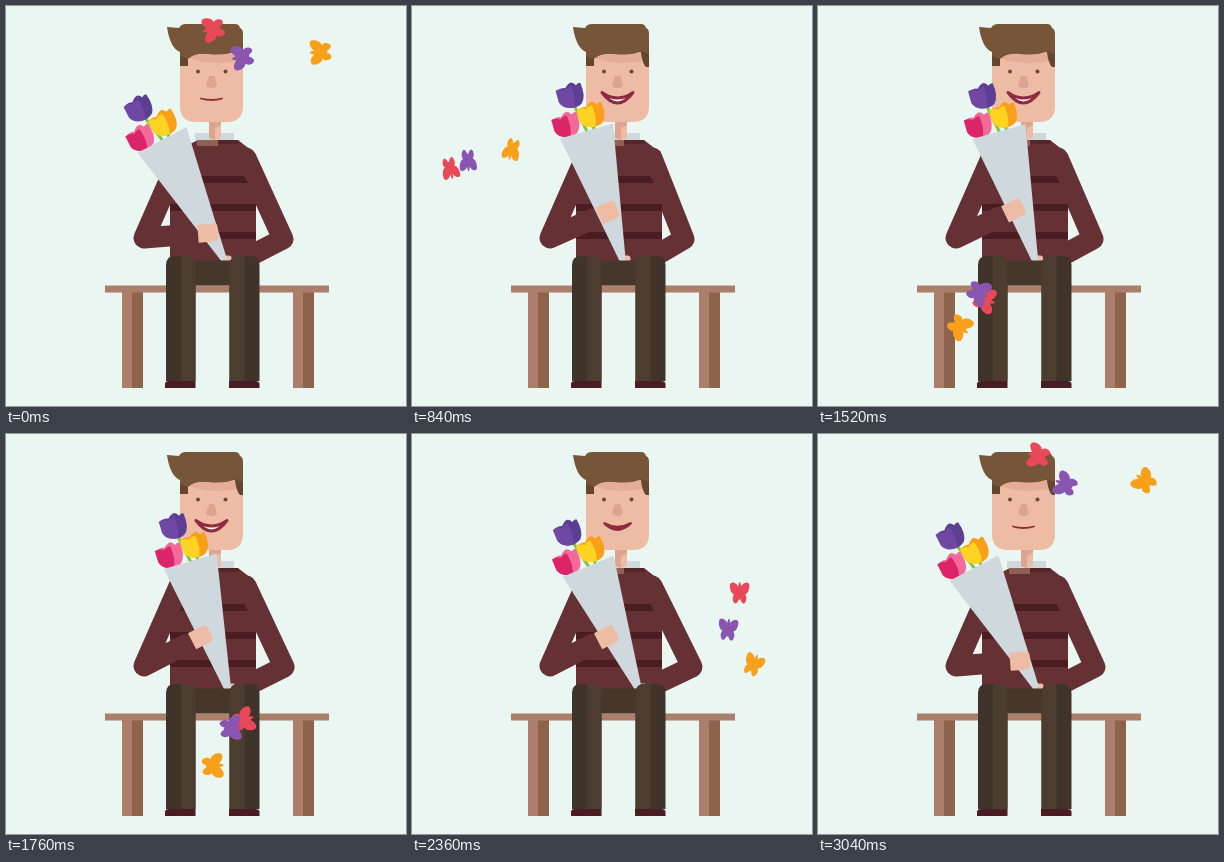
An HTML page for the animation above (3.08 s loop, 400 by 400 pixels).

```html
<!DOCTYPE html>
<html lang="en">
<head>
<meta charset="utf-8">
<title>Bouquet and butterflies</title>
<style>
  html, body { margin: 0; width: 100%; height: 100%; overflow: hidden; background: #e9f6f2; }
  svg { display: block; width: 100vw; height: 100vh; }
  .sleeve { fill: none; stroke: #653134; stroke-width: 21; stroke-linecap: round; stroke-linejoin: round; }
</style>
</head>
<body>
<svg viewBox="0 0 400 400">
  <defs>
    <g id="tulipBack">
      <path d="M-12 -9Q-6 -11 -3 -9Q1 -13 4 -13Q7 -12 8 -9Q11 -11 13 -10Q15 4 9 10Q4 13 -2 12Q-10 10 -12 3Z"/>
    </g>
    <path id="tulipFront" d="M-13 -9Q-7 -10 -4 -7Q0 -10 3 -9Q5 3 1 12Q-10 12 -13 3Z"/>
    <g id="bug">
      <path id="wing" d="M0 -4C3 -10 11 -13 12.500 -8C13 -3 10 1 7 1.500C10 4 9 9 6 10.500C3 11 1 7 0 4Z"/>
      <use href="#wing" transform="scale(-1 1)"/>
      <ellipse rx="2.200" ry="9" cy="-2"/>
    </g>
  </defs>

  <!-- bench -->
  <g fill="#ab7f6b">
    <path d="M116 286h11v96h-11zM287 286h11v96h-11z"/>
    <path fill="#8e634b" d="M126 286h11v96h-11zM297 286h11v96h-11z"/>
    <path d="M99 279.500h224v7H99z"/>
  </g>

  <!-- torso -->
  <path class="sleeve" id="rightArm"/>
  <path fill="#653134" d="M164 256V158Q168 142 184 138L192 134H232L241 141Q250 146 250 156V256Z"/>
  <path fill="#4a1d20" d="M172 170h66l4 7h-70zM164 198h86v7h-86zM164 226h86v7h-86z"/>
  <path fill="#8f6056" d="M191 134h21v6h-21z"/>
  <path fill="#54262a" d="M212 134h20l1 4h-21z"/>
  <path fill="#cfd8dc" d="M189 127h39v7h-39z"/>
  <path fill="#eebca5" d="M203 112h12v20l-6 2-6-2z"/>
  <path fill="#dca58f" d="M203 115h12v4l-6 3v12l-6-2z"/>

  <!-- head -->
  <path fill="#eebca5" d="M174 40H237V100Q237 116 221 116H190Q174 116 174 100Z"/>
  <path fill="#e3ad97" d="M182 46H230V55Q204 60 182 52Z"/>
  <path fill="#64462f" d="M174 40H237V61H234Q230 57 229 46L182 48V60H174Z"/>
  <path fill="#775538" d="M161 21L173 22Q175 18 180 18H229Q233 18 234 22Q237 23 237 28V48Q233 47 229 45Q220 50 202 48Q188 47 182 53L174 50V46Q164 42 161 21Z"/>
  <circle cx="192" cy="65.500" r="2" fill="#6b4a3a"/>
  <circle cx="219.500" cy="65.500" r="2" fill="#6b4a3a"/>
  <path fill="#dda48d" d="M203 70H208.500L211 79Q210 82 206 82Q201 82 200 79Z"/>
  <path id="mouth" fill="#fff" stroke="#8e2b3e" stroke-linecap="round" stroke-linejoin="round"/>

  <!-- bouquet -->
  <path class="sleeve" id="leftArm"/>
  <rect id="tipHand" y="249.500" width="11" height="7" rx="3" fill="#eebca5"/>
  <g id="bouquet">
    <path fill="none" stroke="#84c341" stroke-width="3" d="M-5 -28L1 4M9 -8L7 3"/>
    <g id="tulips"></g>
    <path fill="#cfd8dd" d="M-27.500 0H27.500L3 135H-3Z"/>
  </g>
  <path id="hand" fill="#eebca5" d="M-10 -9H7Q10 -9 10 -5V4Q10 9 5 9H-10Z"/>

  <!-- legs -->
  <path fill="#45372c" d="M178 254.500h57v25h-57z"/>
  <path fill="#40342a" d="M160 375V259Q160 250 169 250H181Q189 250 189.500 259V375ZM223.500 375V259Q224 250 232 250H244Q253.500 250 253.500 259V375Z"/>
  <path fill="#4d3d30" d="M175 250H181Q189 250 189.500 259V375H175ZM223.500 375V259Q224 250 232 250H238.500V375Z"/>
  <path fill="#4a1c23" d="M159 382V378Q159 375 163 375H189.500V382ZM223 382V375H249Q253.500 375 253.500 378V382Z"/>

  <g id="swarm"></g>
</svg>

<script>
const LOOP = 3080;
const TIMES = [0, 360, 840, 1520, 2040, 2680, 3040];
const $ = id => document.getElementById(id);
const RAD = Math.PI / 180;

// Smooth closed curve through one value per entry of TIMES.
function track(values) {
  const n = TIMES.length;
  const time = i => TIMES[(i + n) % n] + LOOP * Math.floor(i / n);
  const value = i => values[(i + n) % n];
  const slope = i => (value(i + 1) - value(i - 1)) / (time(i + 1) - time(i - 1));
  return t => {
    t = (t + LOOP) % LOOP;
    let i = n - 1;
    while (time(i) > t) i--;
    const span = time(i + 1) - time(i);
    const s = (t - time(i)) / span, s2 = s * s, s3 = s2 * s;
    return (2 * s3 - 3 * s2 + 1) * value(i) + (3 * s2 - 2 * s3) * value(i + 1)
      + span * ((s3 - 2 * s2 + s) * slope(i) + (s3 - s2) * slope(i + 1));
  };
}

const pose = {
  x: track([156, 162.5, 174.5, 181, 185, 165, 156]),
  y: track([134, 129.5, 125, 125.5, 130, 134, 134]),
  angle: track([27.4, 22.4, 15.6, 15.6, 18.3, 26.2, 27.4]),
  handX: track([202, 200, 196, 196, 194, 197, 202]),
  handY: track([227, 217, 206, 204, 202, 207, 227]),
  elbow: track([277, 275, 272, 275, 281, 278, 277]),
  smile: track([0, .55, 1, 1, 1, .04, 0])
};

const bugs = [
  { color: "#e94858", x: [208, 104, 38, 166, 308, 313, 221], y: [23, 49, 162, 294, 241, 73, 22] },
  { color: "#f9a01b", x: [315, 209, 100, 141, 290, 367, 327], y: [46, 59, 143, 320, 305, 141, 48] },
  { color: "#8a55b0", x: [237, 145, 56, 160, 292, 312, 248], y: [51, 72, 154, 286, 269, 112, 51] }
].map(b => ({ x: track(b.x), y: track(b.y), el: addUse($("swarm"), "bug", b.color) }));

function addUse(parent, id, color, transform = "") {
  const el = document.createElementNS("http://www.w3.org/2000/svg", "use");
  el.setAttribute("href", "#" + id);
  el.setAttribute("fill", color);
  el.setAttribute("transform", transform);
  return parent.appendChild(el);
}

function addTulip(x, y, back, front) {
  const place = `translate(${x} ${y})`;
  addUse($("tulips"), "tulipBack", back, place);
  addUse($("tulips"), "tulipFront", front, place);
}
addTulip(-6, -38, "#5c3f93", "#7048a4");
addTulip(9, -14, "#f9a01b", "#ffd322");
addTulip(-18, -11, "#f2699a", "#dc2469");

function drawBody(t) {
  const x = pose.x(t), y = pose.y(t), angle = pose.angle(t);
  $("bouquet").setAttribute("transform", `translate(${x} ${y}) rotate(${-angle})`);
  $("tipHand").setAttribute("x", x + 134 * Math.sin(angle * RAD) - 3);

  const hx = pose.handX(t), hy = pose.handY(t);
  const turn = Math.atan2(hy - 232, hx - 138);
  const wx = hx - 17 * Math.cos(turn), wy = hy - 17 * Math.sin(turn);
  $("leftArm").setAttribute("d", `M174 150L138 232L${wx} ${wy}`);
  $("hand").setAttribute("transform", `translate(${hx} ${hy}) rotate(${turn / RAD})`);

  const ex = pose.elbow(t);
  $("rightArm").setAttribute("d", `M240 152L${ex} 233L238 253`);

  const s = Math.min(1, Math.max(0, pose.smile(t)));
  const w = 10.5 + 5 * s, top = 92.5 - 6 * s;
  $("mouth").setAttribute("d",
    `M${205.5 - w} ${top}q${w} ${3 + 8 * s} ${2 * w} 0q${-w} ${3 + 18 * s} ${-2 * w} 0Z`
      .replace(/q(\S+) (\S+) (\S+) 0Z/, (m, a, b, c) => s < .02 ? `q${a} 3 ${c} 0` : m));
  $("mouth").setAttribute("stroke-width", 1.8 + 1.2 * s);
}

function drawBugs(t) {
  const flap = .8 + .2 * Math.cos(2 * Math.PI * (12 * t / LOOP + .07));
  for (const b of bugs) {
    const x = b.x(t), y = b.y(t);
    const dx = b.x(t + 20) - b.x(t - 20), dy = b.y(t + 20) - b.y(t - 20);
    const heading = Math.atan2(dy, dx) / RAD + 90;
    b.el.setAttribute("transform", `translate(${x} ${y}) rotate(${heading}) scale(${flap} 1)`);
  }
}

function frame() {
  const t = performance.now() % LOOP;
  drawBody(t);
  drawBugs(t);
  requestAnimationFrame(frame);
}
frame();
</script>
</body>
</html>
```
